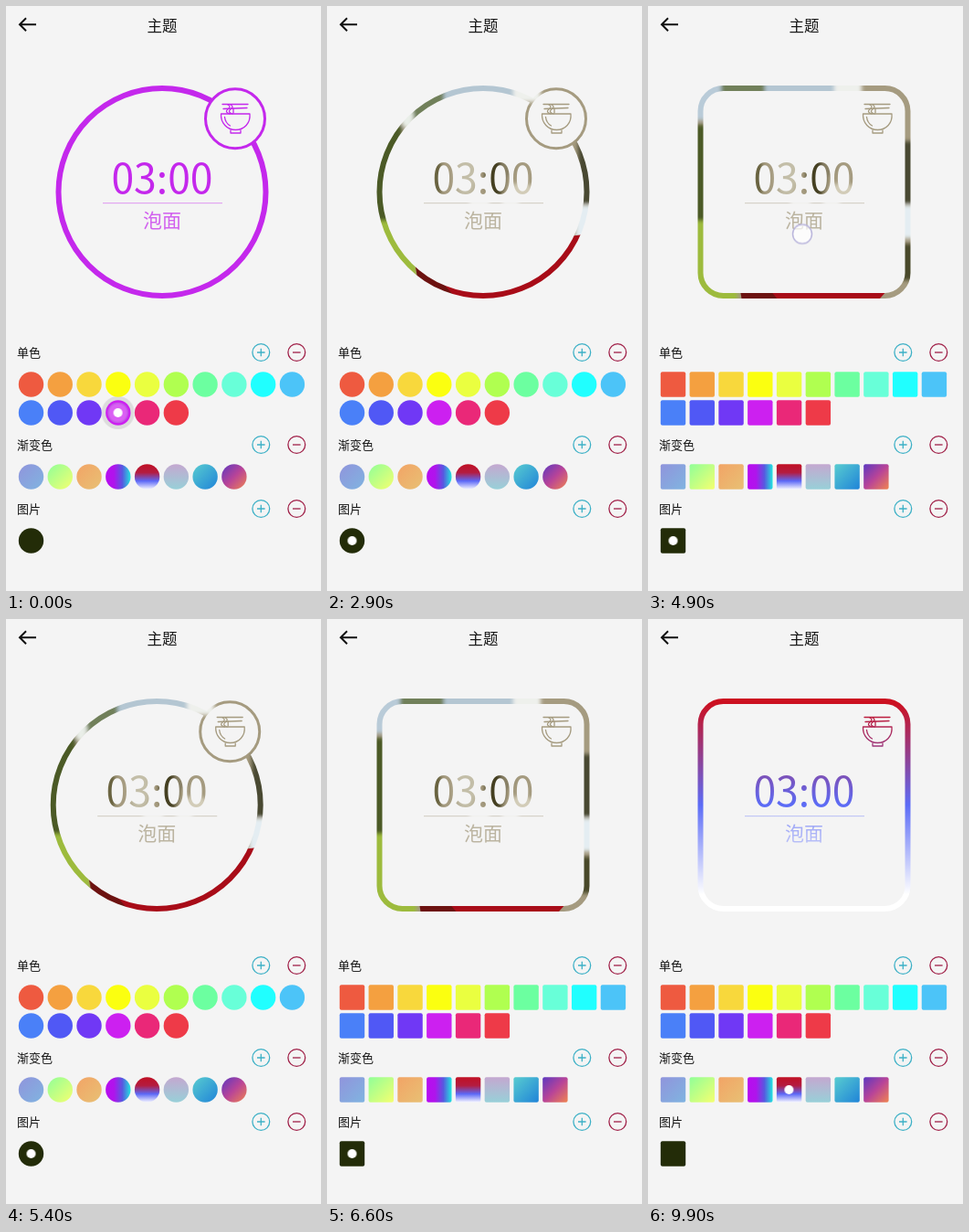
An HTML page that plays this animation: 345x640 px, repeating every 10000 ms.

```html
<!DOCTYPE html>
<html lang="zh-CN">
<head>
<meta charset="utf-8">
<title>主题</title>
<style>
html, body { margin: 0; width: 100%; height: 100%; overflow: hidden; background: #f4f4f4; }
svg { display: block; width: 345px; height: 640px; font-family: "Noto Sans CJK SC", "Noto Sans CJK", "Noto Sans", sans-serif; fill: #161616; }
#stage { animation: theme 10s step-end infinite, corner 10s step-end infinite; }
.ring, .bowl { fill: none; stroke: var(--paint); }
.ring { stroke-width: 6; }
.bowl { stroke-width: 1.3; stroke-linecap: round; stroke-linejoin: round; }
.badge { fill: #f4f4f4; stroke: var(--paint); stroke-width: 3; }
.ink { fill: var(--paint); }
.time { font-size: 44.5px; text-anchor: middle; }
.name { font-size: 21px; text-anchor: middle; opacity: .72; }
.rule { opacity: .38; }
.swatch { rx: var(--corner); }
#pages { animation: swipe 10s infinite; }
#pick { fill: #fff; animation: pick 10s step-end infinite; }
#touch { fill: #fff; fill-opacity: .7; stroke: #bab6dc; stroke-width: 1.5; animation: touch 10s linear infinite; }
#ripple { fill: #000; animation: ripple 10s linear infinite; }

@keyframes theme {
  0% { --paint: #c428ec; }
  10% { --paint: url(#across); }
  23% { --paint: url(#photo); }
  78% { --paint: #c428ec; }
  90%, 100% { --paint: url(#down); }
}
@keyframes corner {
  0% { --corner: 13.7px; }
  39% { --corner: 2px; }
  51.5% { --corner: 13.7px; }
  62%, 100% { --corner: 2px; }
}
@keyframes pick {
  0% { transform: translate(122.6px, 445px); }
  10% { transform: translate(122.6px, 515px); }
  23% { transform: translate(27.5px, 585px); }
  78% { transform: translate(122.6px, 445px); }
  90%, 100% { transform: translate(154.4px, 515px); }
}
@keyframes swipe {
  0%, 37% { transform: none; animation-timing-function: ease-in-out; }
  42%, 49.2% { transform: translateX(-345px); animation-timing-function: ease-in-out; }
  54.5%, 59.2% { transform: none; animation-timing-function: ease-in-out; }
  65.5%, 100% { transform: translateX(-345px); }
}
@keyframes touch {
  0%, .9% { opacity: .4; transform: translate(122.6px, 445px); }
  1%, 8.9% { opacity: 0; transform: translate(122.6px, 515px); }
  9%, 10.9% { opacity: .5; transform: translate(122.6px, 515px); }
  11%, 21.9% { opacity: 0; transform: translate(27.5px, 585px); }
  22%, 23.9% { opacity: .5; transform: translate(27.5px, 585px); }
  24%, 35.9% { opacity: 0; transform: translate(266px, 243px); }
  36%, 37% { opacity: 1; transform: translate(266px, 243px); }
  40% { opacity: 1; transform: translate(70px, 247px); }
  40.1%, 47.9% { opacity: 0; transform: translate(169px, 249.5px); }
  48%, 49.2% { opacity: 1; transform: translate(169px, 249.5px); }
  52% { opacity: 1; transform: translate(310px, 245px); }
  52.1%, 57.9% { opacity: 0; transform: translate(266px, 243px); }
  58%, 59.2% { opacity: 1; transform: translate(266px, 243px); }
  63% { opacity: 1; transform: translate(70px, 247px); }
  63.1%, 76.4% { opacity: 0; transform: translate(122.6px, 445px); }
  76.5%, 78% { opacity: .5; transform: translate(122.6px, 445px); }
  78.1%, 88.4% { opacity: 0; transform: translate(154.4px, 515px); }
  88.5%, 90% { opacity: .5; transform: translate(154.4px, 515px); }
  90.1%, 100% { opacity: 0; transform: translate(154.4px, 515px); }
}
@keyframes ripple {
  0%, 1% { opacity: .1; transform: translate(122.6px, 445px); }
  3% { opacity: 0; transform: translate(122.6px, 445px); }
  9% { opacity: 0; transform: translate(122.6px, 515px); }
  10% { opacity: .1; transform: translate(122.6px, 515px); }
  11.8% { opacity: 0; transform: translate(122.6px, 515px); }
  22% { opacity: 0; transform: translate(27.5px, 585px); }
  23% { opacity: .1; transform: translate(27.5px, 585px); }
  25% { opacity: 0; transform: translate(27.5px, 585px); }
  76.5% { opacity: 0; transform: translate(122.6px, 445px); }
  77.5%, 79% { opacity: .1; transform: translate(122.6px, 445px); }
  81% { opacity: 0; transform: translate(122.6px, 445px); }
  88.5% { opacity: 0; transform: translate(154.4px, 515px); }
  89.5%, 91% { opacity: .1; transform: translate(154.4px, 515px); }
  93%, 100% { opacity: 0; transform: translate(154.4px, 515px); }
}
</style>
</head>
<body>
<svg id="stage" viewBox="0 0 345 640">
  <defs>
    <linearGradient id="across" gradientUnits="userSpaceOnUse" x1="55" y1="0" x2="287" y2="0">
      <stop stop-color="#b414ec"/><stop offset=".5" stop-color="#4a94e2"/><stop offset=".9" stop-color="#1cecec"/><stop offset="1" stop-color="#14f6f2"/>
    </linearGradient>
    <linearGradient id="down" gradientUnits="userSpaceOnUse" x1="0" y1="87" x2="0" y2="320">
      <stop offset=".02" stop-color="#cc1020"/><stop offset=".5" stop-color="#5c6cf6"/><stop offset=".92" stop-color="#fff"/>
    </linearGradient>
    <pattern id="photo" patternUnits="userSpaceOnUse" width="345" height="640">
      <rect width="345" height="640" fill="#a59b80"/>
      <g filter="url(#soft)">
        <rect x="40" y="80" width="40" height="45" fill="#b9cbd8"/>
        <rect x="80" y="75" width="50" height="50" fill="#71805a"/>
        <rect x="40" y="130" width="42" height="110" fill="#4c5a28"/>
        <ellipse cx="88" cy="122" rx="7" ry="12" fill="#e9eee8"/>
        <rect x="128" y="75" width="78" height="35" fill="#b4c6d2"/>
        <rect x="204" y="75" width="30" height="30" fill="#eef0ec"/>
        <rect x="275" y="148" width="25" height="68" fill="#4a4a30"/>
        <rect x="272" y="218" width="30" height="36" fill="#e4edf2"/>
        <rect x="277" y="260" width="25" height="40" fill="#48482c"/>
        <rect x="40" y="235" width="58" height="95" fill="#9dbb3c"/>
        <ellipse cx="121" cy="188" rx="5" ry="22" fill="#66613c"/>
        <ellipse cx="152" cy="185" rx="13" ry="24" fill="#c3bea8"/>
        <ellipse cx="184" cy="188" rx="11" ry="22" fill="#453f22"/>
        <ellipse cx="198" cy="172" rx="8" ry="14" fill="#898166"/>
        <ellipse cx="213" cy="203" rx="14" ry="10" fill="#d2ccb8"/>
        <rect x="156" y="211" width="22" height="8" fill="#f2f2ee"/>
        <rect x="192" y="211" width="18" height="8" fill="#f2f2ee"/>
      </g>
      <path d="M97 285L110 330H245L272 300 281 250 200 260Z" fill="#a80c18"/>
      <path d="M97 285L104 330H150L120 295Z" fill="#6c1210"/>
    </pattern>
    <filter id="soft"><feGaussianBlur stdDeviation="2"/></filter>
    <g id="bowl" class="bowl">
      <path d="M235.5 118H267C268 128 261 135.500 251.500 135.500S235 128 235.500 118Z"/>
      <path d="M246 136V139H257V136M239.500 121.500C240 126 242 129 245.500 131"/>
      <path d="M237 107.500H265M238 112.500L264 111.500"/>
      <path d="M243 108q4 2 0 5t2 5M246 108q4 2 0 5t2 5M249 112v5"/>
    </g>
    <g id="readout">
      <text class="time ink" x="171" y="204.500">03:00</text>
      <rect class="rule ink" x="106" y="215" width="131" height="1.200"/>
      <text class="name ink" x="171" y="242">泡面</text>
    </g>
  </defs>

  <rect width="345" height="640" fill="#f4f4f4"/>
  <g id="pages">
    <g>
      <circle class="ring" cx="171" cy="203.500" r="113.500"/>
      <circle class="badge" cx="251" cy="123.300" r="32.500"/>
      <use href="#bowl"/><use href="#readout"/>
    </g>
    <g transform="translate(345)">
      <rect class="ring" x="57.500" y="90" width="227" height="227" rx="25"/>
      <use href="#bowl"/><use href="#readout"/>
    </g>
  </g>

  <path d="M33 20.300H15.500M22 13.300L15 20.300 22 27.300" fill="none" stroke="#111" stroke-width="2"/>
  <text x="171" y="28" font-size="16.500" font-weight="500" text-anchor="middle">主题</text>
  <g id="sections" font-size="13"></g>
  <circle id="ripple" r="18"/>
  <g id="swatches"></g>
  <circle id="pick" r="5"/>
  <circle id="touch" r="10.500"/>
</svg>
<script>
const get = id => document.getElementById(id);

const section = (label, y) => `
  <text x="12" y="${y + 5}">${label}</text>
  <g fill="none" stroke-width="1.3">
    <g stroke="#3cb0c6"><circle cx="279.300" cy="${y}" r="9.400"/><path d="M275 ${y}h8.600m-4.300 -4.300v8.600"/></g>
    <g stroke="#a02048"><circle cx="318.300" cy="${y}" r="9.400"/><path d="M314 ${y}h8.600"/></g>
  </g>`;

const swatch = (paint, col, y) =>
  `<rect class="swatch" x="${13.8 + col * 31.77}" y="${y - 13.7}" width="27.4" height="27.4" fill="${paint}"/>`;

const solids = ("#ee5a40 #f4a040 #f8d83c #fbff10 #eaff40 #b0ff50 #6cffa0 #68ffd8 #20ffff #4cc4f8 " +
  "#4a80f8 #5058f5 #7038f5 #cc20f0 #ea2878 #ee3a48").split(" ");

// Each blend: end point of its axis, then its colours.
const blends = [
  [1, 1, "#9094dc", "#80b4e0"],
  [1, 1, "#90ff98", "#f4ff70"],
  [1, 1, "#f2a466", "#e8c074"],
  [1, 0, "#b80cf0", "#b014ec", "#5858e0", "#20e4e0"],
  [0, 1, "#c01024", "#b41c40", "#5c68f6", "#f4f4ff"],
  [0, 1, "#c4a8d0", "#98d0d8"],
  [1, 1, "#58ccd0", "#2084d8"],
  [1, 1, "#5c38c0", "#b84498", "#f08450"]
];

const blendDef = ([x, y, ...colors], i) =>
  `<linearGradient id="blend${i}" x2="${x}" y2="${y}">` +
  colors.map((c, k) => `<stop offset="${k / (colors.length - 1)}" stop-color="${c}"/>`).join("") +
  `</linearGradient>`;

get("sections").innerHTML = section("单色", 379) + section("渐变色", 480) + section("图片", 550);
get("swatches").innerHTML =
  blends.map(blendDef).join("") +
  solids.map((c, i) => swatch(c, i % 10, i < 10 ? 414 : 445)).join("") +
  blends.map((b, i) => swatch(`url(#blend${i})`, i, 515)).join("") +
  swatch("#232c08", 0, 585);
</script>
</body>
</html>
```
